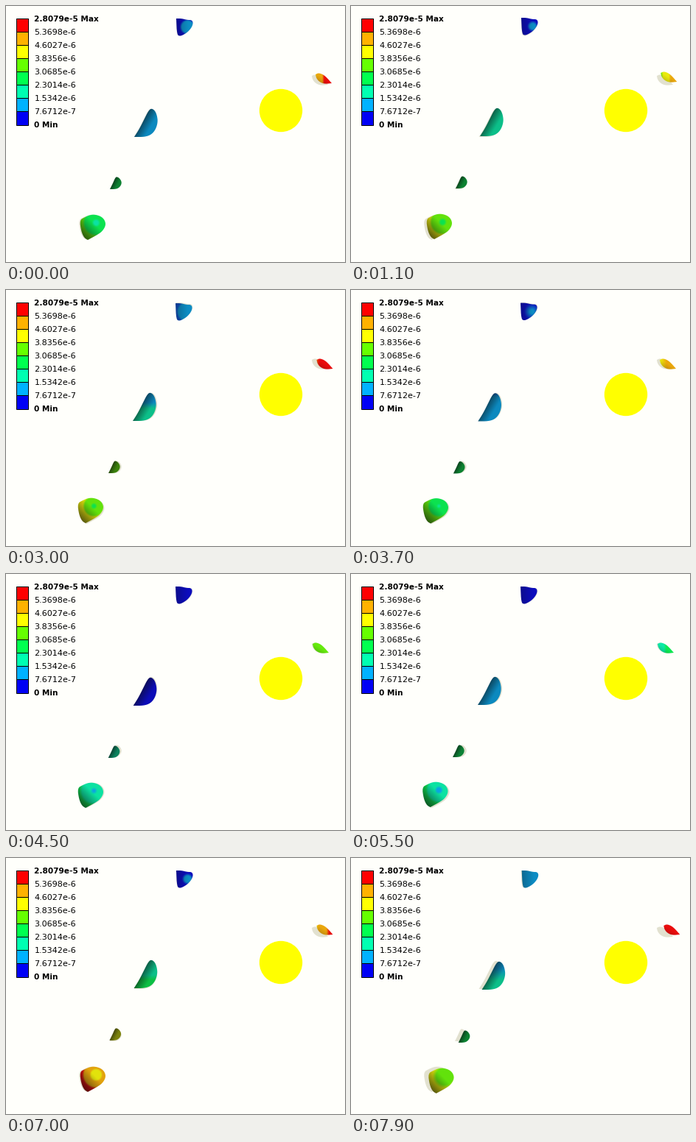
Animation, 460 px wide and 348 px high, one loop 8 s. Source, as a matplotlib script:

```python
import numpy as np
import matplotlib.pyplot as plt
from matplotlib.animation import FuncAnimation
from matplotlib.patches import Circle, PathPatch, Rectangle
from matplotlib.path import Path
from matplotlib.transforms import Affine2D

W, H, DPI = 460, 348, 64
FRAMES, STEP = 80, 100
PX = 72 / DPI

BANDS = np.array([
    [0, 0, 245], [0, 178, 255], [0, 255, 178], [0, 255, 80],
    [102, 255, 0], [255, 255, 0], [255, 178, 0], [255, 0, 0],
]) / 255
LABELS = ["2.8079e-5 Max", "5.3698e-6", "4.6027e-6", "3.8356e-6", "3.0685e-6",
          "2.3014e-6", "1.5342e-6", "7.6712e-7", "0 Min"]

# Seconds at which each body's pose and stress are given
KEYS = np.array([0, 1.1, 3.0, 4.5, 5.5, 7.0, 7.9])


def ease_keys(t, values):
    """Cosine easing between the values at KEYS."""
    i = min(np.searchsorted(KEYS, t, side="right") - 1, len(KEYS) - 2)
    u = np.clip((t - KEYS[i]) / (KEYS[i + 1] - KEYS[i]), 0, 1)
    u = (1 - np.cos(np.pi * u)) / 2
    return values[i] * (1 - u) + values[i + 1] * u


def rounded(points, rounds=2):
    """Corner-cut outline; a repeated point stays a sharp corner."""
    p = np.array(points, float)
    for _ in range(rounds):
        q = np.roll(p, -1, axis=0)
        p = np.stack([p * .75 + q * .25, p * .25 + q * .75], 1).reshape(-1, 2)
    return Path(np.vstack([p, p[:1]]), closed=True)


def band_colors(v):
    """Contour colours with narrow blends between the bands."""
    v = np.clip(v, 0, 7)
    i = np.minimum(v.astype(int), 6)
    u = np.clip((v - i - .5) * 4 + .5, 0, 1)[..., None]
    return BANDS[i] * (1 - u) + BANDS[i + 1] * u


class Body:
    def __init__(self, ax, outline, weight, shade, shift, stress, rest):
        self.ax = ax
        self.path = rounded(outline)
        self.shift = np.array(shift, float)
        self.stress = np.array(stress, float)
        (x0, y0), (x1, y1) = np.min(outline, 0) - 2, np.max(outline, 0) + 2
        self.box = np.array([x0, x1, y1, y0], float)
        x, y = np.meshgrid(np.arange(x0, x1, .5) + .25,
                           np.arange(y0, y1, .5) + .25)
        self.weight = np.clip(weight(x, y), 0, 1)
        self.shade = shade(x, y)[..., None]
        ax.add_patch(PathPatch(self.path, fc="#e2e1cf", lw=0, zorder=1,
                               transform=Affine2D().translate(*rest) + ax.transData))
        self.image = ax.imshow(np.zeros(x.shape + (3,)), extent=self.box,
                               aspect="auto", interpolation="bilinear", zorder=2)

    def pose(self, t):
        dx, dy = ease_keys(t, self.shift)
        low, high = ease_keys(t, self.stress)
        color = band_colors(low + (high - low) * self.weight)
        self.image.set_data(np.clip(color * self.shade + .05, 0, 1))
        self.image.set_extent(self.box + [dx, dx, dy, dy])
        self.image.set_clip_path(
            self.path, Affine2D().translate(dx, dy) + self.ax.transData)


fig = plt.figure(figsize=(W / DPI, H / DPI), dpi=DPI, facecolor="#fffffb")
ax = fig.add_axes([0, 0, 1, 1])

top = Body(
    ax,
    [(231, 17), (231, 17), (238, 17), (246, 19), (252, 19), (254, 23),
     (252, 29), (247, 35), (241, 39), (236, 41), (232, 39)],
    lambda x, y: np.hypot(x - 246.5, y - 28.5) / 14,
    lambda x, y: np.clip(.52 + (x - 231) * .012, .5, .72),
    [(0, 0), (0, -1), (-1, 1), (-1, 0), (-1, 0), (0, 0), (.7, 0)],
    [(1.3, .1), (.9, -.1), (1.2, .5), (.1, 0), (0, 0), (.95, -.1), (1.4, .9)],
    rest=(-.3, 0))

cone = Body(
    ax,
    [(416, 95), (416, 95), (420, 93), (426, 95), (431, 99), (438, 107),
     (438, 107), (428, 108), (421, 105), (417, 100)],
    lambda x, y: (x - 416) / 22,
    lambda x, y: np.clip(.85 + ((x - 416) * .6 - (y - 95)) * .018, .6, .87),
    [(4, -2), (4.3, -4), (5.5, 0), (0, 0), (0, 0), (5.5, -3), (8.3, -3)],
    [(5.5, 7.6), (4.3, 6.4), (6.5, 7.5), (3.9, 4.2), (1.8, 3.3), (5.5, 7), (7, 7.5)],
    rest=(-1, 0))

middle = Body(
    ax,
    [(174, 178), (174, 178), (181, 167), (188, 153), (193, 143), (197, 139),
     (202, 142), (205, 149), (206, 158), (203, 168), (197, 175), (188, 178)],
    lambda x, y: (176 - y) / 38,
    lambda x, y: np.clip(.36 + ((x - 174) * .86 + (y - 178) * .51) * .028, .33, .7),
    [(0, 0), (1, -1), (-2, 0), (-1.3, 1), (-2, 0), (-.4, -1), (3.5, 1)],
    [(1.3, 1), (2, 1.6), (2.1, .9), (0, 0), (1.2, 1), (3, 1.5), (1.8, 1.2)],
    rest=(-.5, 0))

small = Body(
    ax,
    [(141, 249), (141, 249), (145, 241), (148, 234), (150, 232), (154, 234),
     (157, 239), (156, 244), (152, 248), (147, 249)],
    lambda x, y: (249 - y) / 17,
    lambda x, y: np.clip(.24 + ((x - 141) * .88 + (y - 249) * .47) * .035, .22, .46),
    [(0, 0), (1, -1), (-2, 0), (-2.3, 1), (-3, 0), (-.6, -1), (4.7, 2)],
    [(2.6, 2.7), (3.3, 3.2), (4, 4), (1.9, 1.8), (2.6, 2.6), (4.6, 4.6), (3.3, 3.3)],
    rest=(0, 0))

bottom = Body(
    ax,
    [(100, 291), (107, 287), (114, 284), (121, 283.5), (129, 286), (134, 291),
     (135.5, 298), (131, 306), (124, 311), (111, 318), (111, 318),
     (106, 315), (102, 306)],
    lambda x, y: np.hypot(x - 122, y - 295) / 22,
    lambda x, y: np.clip(.38 + ((x - 104) - (y - 308)) * .0165, .25, .84),
    [(0, 0), (2, -1), (-3, -1), (-3, 0), (-3.5, -1), (0, 0), (4.6, 2)],
    [(2.15, 3.95), (3.15, 5), (3.2, 5.3), (1.3, 2.8), (1.15, 3), (4.7, 7), (3.8, 4.9)],
    rest=(-1.5, 0))

bodies = [top, cone, middle, small, bottom]

ax.add_patch(Circle((373, 142), 29.2, fc="#ffff00", lw=0, zorder=3))

cell = 145 / 8
for i, color in enumerate(BANDS[::-1]):
    ax.add_patch(Rectangle((13.5, 16.5 + i * cell), 16, cell, fc=color,
                           ec="black", lw=PX, zorder=3))
for i, label in enumerate(LABELS):
    bold = i in (0, len(LABELS) - 1)
    ax.text(38.5, 21 + 18 * i, label, family="DejaVu Sans", color="black",
            size=(10.5 if bold else 11.15) * PX,
            weight="bold" if bold else "normal", va="baseline")

ax.set_xlim(0, W)
ax.set_ylim(H, 0)
ax.axis("off")


def update(i):
    for body in bodies:
        body.pose(i * STEP / 1000)
    return [body.image for body in bodies]


anim = FuncAnimation(fig, update, frames=FRAMES, interval=STEP,
                     repeat=True, repeat_delay=0, blit=False)
plt.show()
```
